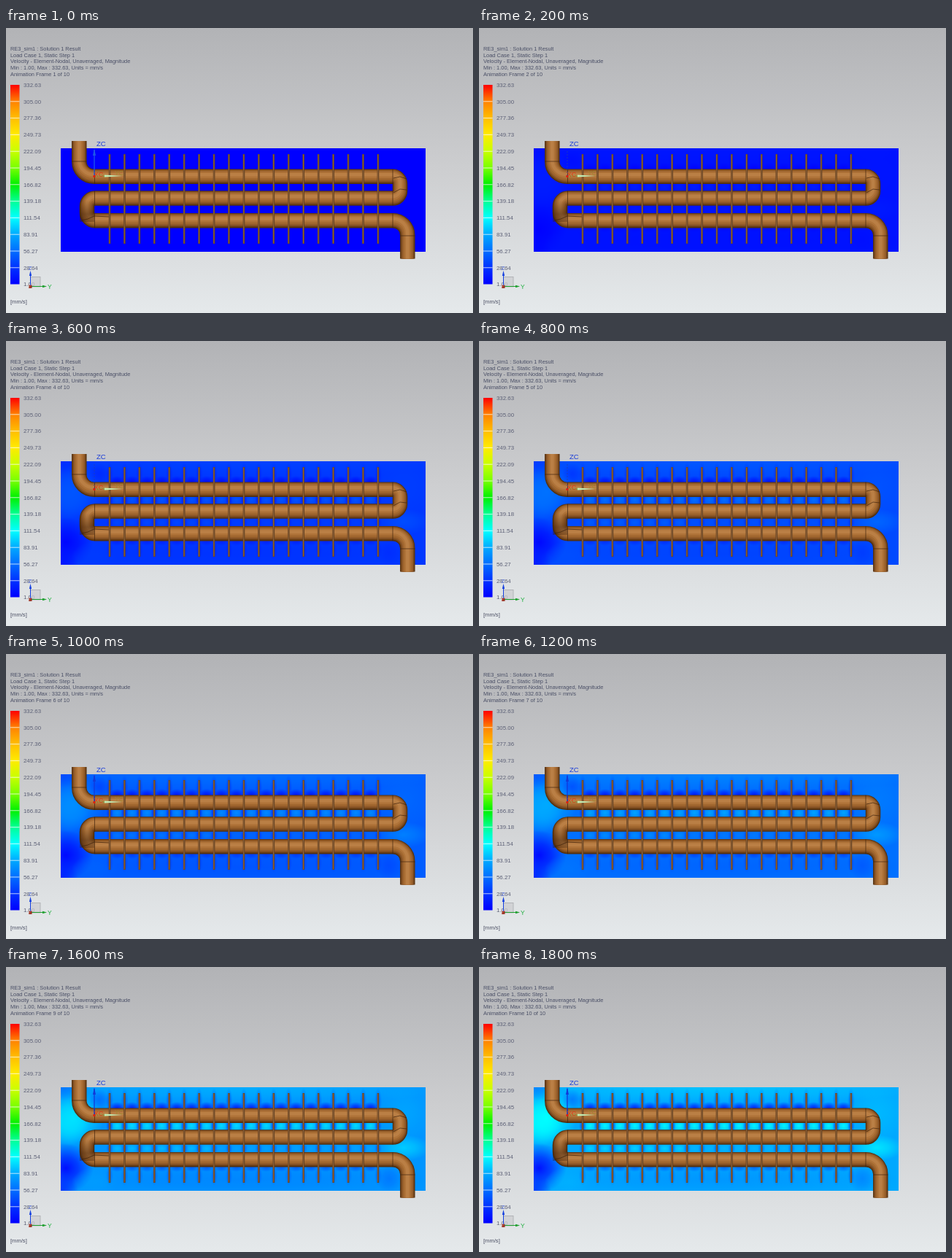
Recreate the animation shown at these times as an HTML page with a canvas. Size 640 px wide and 391 px high, loop 2 s.

```html
<!DOCTYPE html>
<html>
<head>
<meta charset="utf-8">
<style>
html, body { margin: 0; width: 100%; height: 100%; overflow: hidden; }
canvas { display: block; }
</style>
</head>
<body>
<canvas id="stage" width="640" height="391"></canvas>
<script>
const ctx = document.getElementById('stage').getContext('2d');
const FONT = '"Liberation Sans", Arial, sans-serif';
const PLATE = { x: 75, y: 165, w: 500, h: 142 };
const STEPS = 10, STEP_MS = 200;
const MIN = 1, MAX = 332.634;
const fins = Array.from({ length: 19 }, (_, i) => 142 + i * 20.44);

function text(c, s, x, y, size, color) {
  c.font = `${size}px ${FONT}`;
  c.textBaseline = 'alphabetic';
  c.fillStyle = color;
  c.fillText(s, x, y);
}

function line(c, color, width, ...p) {
  c.strokeStyle = color;
  c.lineWidth = width;
  c.beginPath();
  for (let i = 0; i < p.length; i += 2) c.lineTo(p[i], p[i + 1]);
  c.stroke();
}

function triangle(c, color, ...p) {
  c.fillStyle = color;
  c.beginPath();
  for (let i = 0; i < 6; i += 2) c.lineTo(p[i], p[i + 1]);
  c.fill();
}

function layer(draw) {
  const canvas = document.createElement('canvas');
  canvas.width = 640;
  canvas.height = 391;
  draw(canvas.getContext('2d'));
  return canvas;
}

// Soft elliptical patch; green runs from 0 (blue) to 255 (cyan).
function blob(c, x, y, rx, ry, green, alpha = 1) {
  c.save();
  c.translate(x, y);
  c.scale(rx, ry);
  const g = c.createRadialGradient(0, 0, 0, 0, 0, 1);
  g.addColorStop(0, `rgba(0,${green},255,${alpha})`);
  g.addColorStop(0.45, `rgba(0,${green},255,${alpha * 0.65})`);
  g.addColorStop(1, `rgba(0,${green},255,0)`);
  c.fillStyle = g;
  c.fillRect(-1, -1, 2, 2);
  c.restore();
}

// Velocity field at full amplitude
const field = layer(c => {
  c.beginPath();
  c.rect(PLATE.x, PLATE.y, PLATE.w, PLATE.h);
  c.clip();
  c.fillStyle = 'rgb(0,168,255)';
  c.fillRect(PLATE.x, PLATE.y, PLATE.w, PLATE.h);
  blob(c, 325, 168, 300, 18, 205, 0.7);
  blob(c, 325, 292, 260, 22, 140, 0.6);
  blob(c, 92, 207, 42, 40, 255);
  blob(c, 84, 215, 30, 30, 255, 0.8);
  blob(c, 76, 166, 34, 18, 110, 0.6);
  blob(c, 82, 276, 38, 34, 10, 0.95);
  blob(c, 75, 307, 24, 24, 40, 0.8);
  blob(c, 122, 295, 32, 20, 180, 0.7);
  blob(c, 128, 182, 14, 14, 100, 0.6);
  blob(c, 545, 200, 40, 40, 195, 0.6);
  blob(c, 545, 248, 36, 18, 235, 0.9);
  blob(c, 525, 290, 18, 20, 110, 0.5);
  fins.slice(0, -1).forEach((x, i) => {
    const mid = x + 10.2;
    blob(c, mid, 194, 13, 9, 20, 0.9);
    blob(c, mid, 218, 10, 10, 250, 0.95);
    blob(c, mid, 249, 9, 7, i < 7 ? 220 : 185, 0.75);
    blob(c, mid, 275, 11, 6, 70, 0.6);
  });
  fins.forEach(x => {
    blob(c, x, 184, 5, 18, 80, 0.55);
    blob(c, x, 218, 5, 10, 60, 0.75);
    blob(c, x, 249, 5, 8, 70, 0.55);
    blob(c, x, 286, 5, 14, 90, 0.5);
  });
});

function tracePipe(c) {
  c.beginPath();
  c.moveTo(100.3, 150);
  c.arcTo(100.3, 203.7, 122, 203.7, 20);
  c.arcTo(540, 203.7, 540, 233.6, 10);
  c.arcTo(540, 233.6, 122, 233.6, 10);
  c.arcTo(111, 233.6, 111, 264.2, 11);
  c.arcTo(111, 264.2, 122, 264.2, 11);
  c.arcTo(550.3, 264.2, 550.3, 316, 20);
  c.lineTo(550.3, 325);
}

const exchanger = layer(c => {
  c.save();
  c.beginPath();
  c.rect(75, 155, 500, 161.5);
  c.clip();
  // Each lighter band sits a little higher: the light comes from above.
  const shades = [[20.5, '#54300f'], [18.2, '#76471d'], [15.5, '#905928'],
    [12.5, '#a1672f'], [8.5, '#af7339'], [4.5, '#ba7f45']];
  shades.forEach(([width, color], i) => {
    c.save();
    c.translate(0, -0.5 * i);
    tracePipe(c);
    c.lineWidth = width;
    c.strokeStyle = color;
    c.stroke();
    c.restore();
  });
  c.restore();

  // Return bend in shade
  const shade = c.createLinearGradient(0, 236, 0, 268);
  shade.addColorStop(0, 'rgba(60,30,8,0)');
  shade.addColorStop(0.6, 'rgba(60,30,8,.5)');
  shade.addColorStop(1, 'rgba(60,30,8,.3)');
  line(c, shade, 20, 111, 236, 111, 266);

  const seam = 'rgba(60,34,12,.85)';
  line(c, seam, 0.8, 90, 183, 110.5, 183);
  line(c, seam, 0.8, 540, 285, 560.5, 285);
  for (const y of [203.7, 233.6, 264.2]) {
    line(c, seam, 0.8, 121.5, y - 10, 121.5, y + 10);
    line(c, seam, 0.8, 530, y - 10, 530, y + 10);
  }
  line(c, seam, 0.8, 531, 206, 540, 204, 549, 207);
  line(c, seam, 0.8, 531, 226, 540, 221, 549, 222);
  line(c, seam, 0.8, 103, 264, 112, 262, 121, 258, 141, 259);
  for (const x of fins) {
    line(c, '#5e4024', 2.6, x, 173, x, 296);
    line(c, '#936236', 1.1, x - 0.2, 173.5, x - 0.2, 295.5);
  }
});

const backdrop = layer(c => {
  const sky = c.createLinearGradient(0, 0, 0, 391);
  sky.addColorStop(0, '#b2b3b6');
  sky.addColorStop(0.5, '#cdced0');
  sky.addColorStop(1, '#e5e9eb');
  c.fillStyle = sky;
  c.fillRect(0, 0, 640, 391);

  const ramp = ['#f00', '#ff8200', '#ffbe00', '#ffeb00', '#c8ff00', '#78ff00', '#00f000',
    '#00ff96', '#0ff', '#00aaff', '#006eff', '#0032ff', '#00f'];
  const bar = c.createLinearGradient(0, 78, 0, 351.5);
  ramp.forEach((color, i) => bar.addColorStop(i / 12, color));
  c.fillStyle = bar;
  c.fillRect(6, 78, 12.5, 273.5);
  ramp.forEach((_, i) => {
    const y = 78 + i * 22.8;
    if (i && i < 12) line(c, 'rgba(255,255,255,.75)', 1, 6, y, 18.5, y);
    text(c, (MAX - (MAX - MIN) * i / 12).toFixed(2), 24, y + 2.8, 7.85, '#5c6076');
  });
  text(c, '[mm/s]', 6, 377.5, 7.6, '#4a4e62');
});

function drawTriad() {
  ctx.fillStyle = 'rgba(205,205,208,.75)';
  ctx.fillRect(33, 341, 14, 14);
  ctx.lineWidth = 0.8;
  ctx.strokeStyle = '#aaacb0';
  ctx.strokeRect(33.5, 341.5, 13.5, 13.5);
  text(ctx, 'Z', 30.5, 331.5, 8, '#4a64d0');
  line(ctx, '#1440e0', 1, 33.5, 354, 33.5, 338);
  triangle(ctx, '#1440e0', 31.8, 340, 35.2, 340, 33.5, 333);
  line(ctx, '#20a030', 1, 34, 354.5, 51, 354.5);
  triangle(ctx, '#20a030', 50, 352.8, 50, 356.2, 56, 354.5);
  text(ctx, 'Y', 57, 357.8, 8.5, '#20b040');
  ctx.fillStyle = '#903020';
  ctx.fillRect(31.5, 353, 4, 4);
  text(ctx, 'X', 30.5, 357, 7, '#c05040');
}

function drawAxes(step) {
  const faded = step > 0 && step < 5;
  const blue = step === 0 ? '#1c58e8' : '#1238d8';
  if (faded) ctx.setLineDash([2, 2]);
  line(ctx, faded ? '#2040b0' : blue, faded ? 0.8 : 1.3, 121, 203, 121, 167);
  ctx.setLineDash([]);
  if (!faded) triangle(ctx, blue, 119, 175, 123, 175, 121, 165);
  text(ctx, 'ZC', 124, 162.2, 9.6, '#1a3cd8');
  line(ctx, '#70b850', 1, 121, 203, 137, 203);
  triangle(ctx, '#c0ecb4', 135, 201.5, 135, 204.5, 160, 203);
  text(ctx, 'YC', 149, 201.5, 8.5, '#a08830');
  text(ctx, 'XC', 120.5, 203.5, 9.2, '#e03818');
  ctx.fillStyle = '#d82010';
  ctx.fillRect(119.5, 202, 3, 3);
}

function draw(now) {
  const step = Math.floor(now / STEP_MS) % STEPS;
  ctx.drawImage(backdrop, 0, 0);
  ['RE3_sim1 : Solution 1 Result',
    'Load Case 1, Static Step 1',
    'Velocity - Element-Nodal, Unaveraged, Magnitude',
    'Min : 1.00, Max : 332.63, Units = mm/s',
    `Animation Frame ${step + 1} of ${STEPS}`
  ].forEach((s, i) => text(ctx, s, 6, 31 + i * 8.65, 7.42, '#4a4f66'));

  ctx.fillStyle = '#00f';
  ctx.fillRect(PLATE.x, PLATE.y, PLATE.w, PLATE.h);
  ctx.globalAlpha = step / (STEPS - 1);
  ctx.drawImage(field, 0, 0);
  ctx.globalAlpha = 1;
  ctx.drawImage(exchanger, 0, 0);
  drawAxes(step);
  drawTriad();
}

const start = performance.now();
function tick() {
  draw(performance.now() - start);
  requestAnimationFrame(tick);
}
tick();
</script>
</body>
</html>
```
